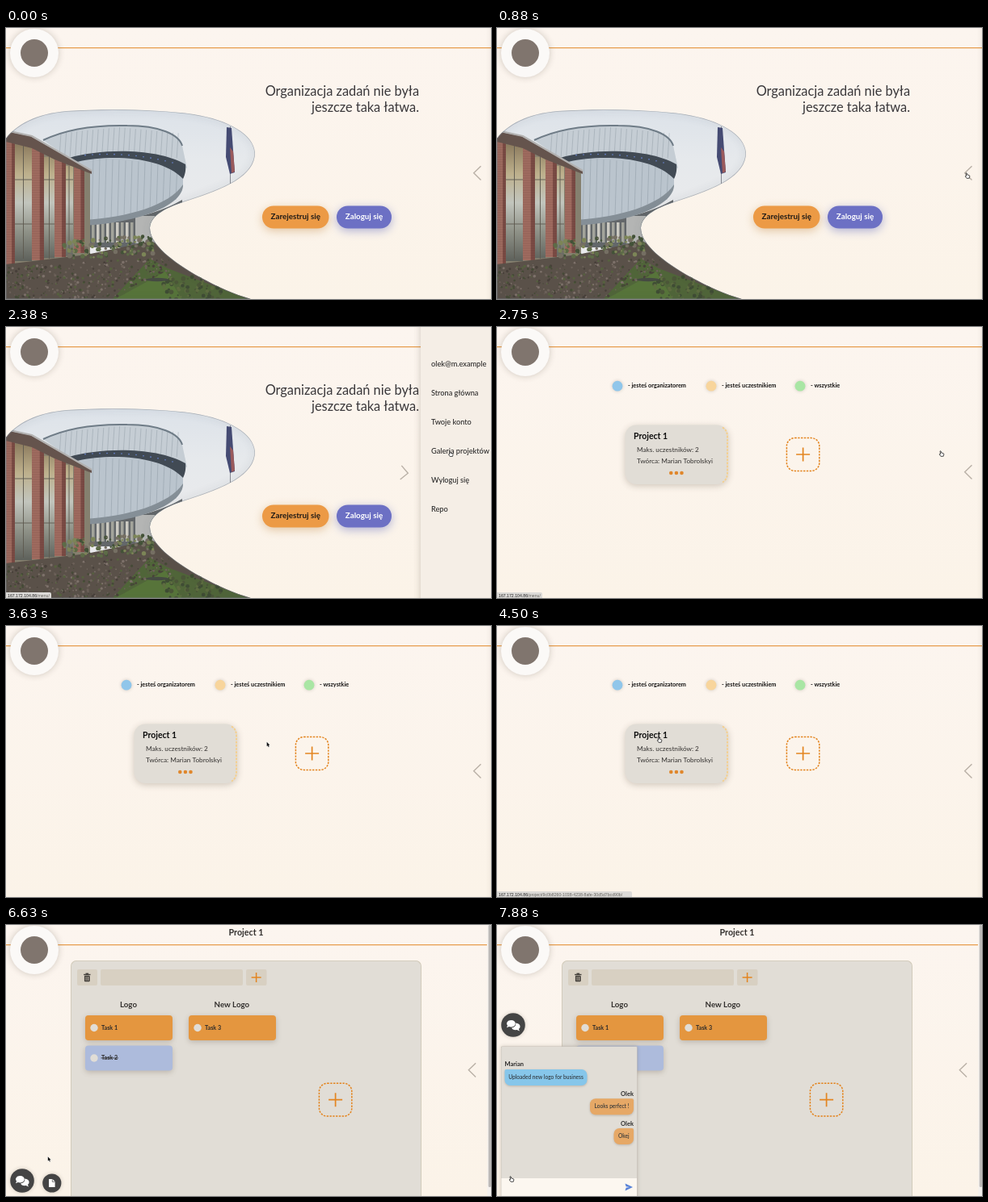
Write an HTML page with a canvas that moves like this. It is 600 px wide and 336 px high and loops after 8 s.

```html
<!DOCTYPE html>
<html lang="pl">
<head>
<meta charset="utf-8">
<title>Organizacja zadań</title>
<style>
html, body { margin: 0; width: 100%; height: 100%; overflow: hidden; background: #fbf4eb; }
canvas { display: block; width: 600px; height: 336px; }
</style>
</head>
<body>
<canvas id="stage"></canvas>
<script>
const W = 600, H = 336, LOOP = 8000, STEP = 125;
const ORANGE = '#e38520', STONE = '#e1ddd6', INK = '#2b2a2a';
const HOST = '167.172.104.86';

const canvas = document.getElementById('stage');
const ctx = canvas.getContext('2d');
const dpr = window.devicePixelRatio || 1;
canvas.width = W * dpr;
canvas.height = H * dpr;
ctx.scale(dpr, dpr);

const clamp = v => Math.max(0, Math.min(1, v));
const ease = v => v * v * (3 - 2 * v);
const ramp = (t, a, b) => ease(clamp((t - a) / (b - a)));

function fill(d, color) {
  ctx.fillStyle = color;
  ctx.fill(new Path2D(d));
}

function line(d, color, width = 1) {
  ctx.strokeStyle = color;
  ctx.lineWidth = width;
  ctx.stroke(new Path2D(d));
}

function gradient(y0, y1, ...colors) {
  const g = ctx.createLinearGradient(0, y0, 0, y1);
  colors.forEach((c, i) => g.addColorStop(i / (colors.length - 1), c));
  return g;
}

function shadow(blur, color = 'rgba(70,55,40,.25)', dy = 0) {
  ctx.shadowBlur = blur * dpr;
  ctx.shadowColor = color;
  ctx.shadowOffsetY = dy * dpr;
}

function noShadow() {
  shadow(0, 'transparent');
}

function box(x, y, w, h, r, color, blur = 0, dy = 0, glow) {
  if (blur) shadow(blur, glow, dy);
  ctx.fillStyle = color;
  ctx.beginPath();
  ctx.roundRect(x, y, w, h, r);
  ctx.fill();
  noShadow();
}

function disc(x, y, r, color, blur = 0) {
  if (blur) shadow(blur);
  ctx.fillStyle = color;
  ctx.beginPath();
  ctx.arc(x, y, r, 0, 7);
  ctx.fill();
  noShadow();
}

// y is the vertical middle of the lowercase letters
function text(s, x, y, size, { weight = 500, align = 'left', color = INK, family = 'Lato, "Noto Sans"' } = {}) {
  ctx.font = `${weight} ${size}px ${family}, sans-serif`;
  ctx.textAlign = align;
  ctx.fillStyle = color;
  ctx.fillText(s, x, y + size * 0.33);
}

function plus(x, y, size, width) {
  const r = size / 2;
  line(`M${x - r},${y}H${x + r}M${x},${y - r}V${y + r}`, ORANGE, width);
}

function addTile(x, y) {
  ctx.setLineDash([2.4, 1.4]);
  ctx.strokeStyle = ORANGE;
  ctx.lineWidth = 1.5;
  ctx.beginPath();
  ctx.roundRect(x - 20.2, y - 20.4, 40.4, 40.8, 10);
  ctx.stroke();
  ctx.setLineDash([]);
  plus(x, y, 17, 1.7);
}

function chevron(x, turn) {
  ctx.save();
  ctx.translate(x, 179.8 + turn);
  ctx.rotate(Math.PI * turn);
  line('M4.5,-8.6L-4.3,0L4.5,8.6', '#b9b0a6', 1.4);
  ctx.restore();
}

function backdrop() {
  ctx.fillStyle = gradient(0, H, '#fcf5ef', '#fbf3e8');
  ctx.fillRect(0, 0, W, H);
}

function header(right) {
  box(0, 23.9, right, 1.4, 0, '#e69c4c');
  disc(35, 31, 30, '#fbf9f7', 9);
  disc(35, 31, 17, '#80756e');
}

const blob = new Path2D('M0,137C12,120 38,106 75,103C125,100 190,101 232,107C276,114 306,132 308,154' +
  'C309,184 268,200 228,213C198,222 179,232 178,248C178,268 206,290 240,309C262,321 282,330 303,336H0Z');

function brick(x, y, w, bottom) {
  box(x, y, w, bottom - y, 0, '#a06c60');
  box(x + w * 0.65, y, w * 0.35, bottom - y, 0, '#7a4c45');
  for (let row = y + 2; row < bottom; row += 3) line(`M${x},${row}h${w}`, 'rgba(80,45,40,.25)', 0.7);
}

function seams(count, x, step, top, bottom) {
  for (let i = 0; i < count; i++) {
    const px = x + i * step;
    line(`M${px},${top(px)}L${px - 2},${bottom(px)}`, 'rgba(105,118,130,.4)', 0.7);
  }
}

function foliage(count, x0, x1, y0, y1, colors, size) {
  let seed = 17;
  const rnd = () => (seed = (seed * 16807) % 2147483647) / 2147483647;
  for (let i = 0; i < count; i++) {
    const x = x0 + rnd() * (x1 - x0);
    const y = y0 + rnd() * (y1 - y0) - x * 0.06;
    disc(x, y, size * (0.5 + rnd()), colors[i % colors.length]);
  }
}

function hall() {
  // entrance
  fill('M97,236C140,243 185,232 218,213V240L180,272H97Z', '#63676a');
  for (let x = 106; x < 160; x += 6) box(x, 241, 3.5, 25, 0, x % 4 ? '#a3a49b' : '#cccac2');
  box(160, 233, 24, 34, 0, '#b4b5b4');

  // lower drum
  fill('M85,163C125,155 190,157 219,178V196C213,216 165,236 97,242Z', '#bac4cd');
  seams(14, 108, 8, x => 161 + (x - 108) * 0.08, x => 239 - (x - 108) ** 2 * 0.0024);
  fill('M97,238C150,235 202,220 219,194C220,220 165,241 97,245Z', '#858f97');

  // upper drum with its window band
  fill('M46,139C75,125 110,120 150,121C190,121 214,132 218,146L224,174C185,152 130,150 82,164Z', '#c5cdd4');
  seams(23, 68, 6.6, x => 123 + Math.abs(x - 140) * 0.1, x => 156 + (x - 140) ** 2 * 0.001);
  line('M46,139C75,125 110,120 150,121C190,121 214,132 218,146', '#6f7c87', 2);
  fill('M78,161C120,149 187,149 222,169C223,177 221,183 219,187C194,160 130,156 88,166Z', '#414a54');
  for (let x = 98; x < 212; x += 9) disc(x, 156.5 + (x - 125) ** 2 * 0.0016, 0.8, '#6a87d8');
}

function wing() {
  fill('M0,136L104,178V284L0,294Z', '#85806f');
  for (const [x, w] of [[11, 21], [47, 13], [73, 10]]) {
    const top = 140 + x * 0.42;
    box(x, top, w, 290 - top - x * 0.1, 0, gradient(145, 288, '#8d7c5f', '#bdb08c', '#c2c5bd', '#8f9288', '#5f625c'));
    line(`M${x + w / 2},${top}V286M${x},188H${x + w}M${x},243H${x + w}`, '#5d594f', 0.9);
  }
  brick(0, 140, 11, 294);
  brick(32, 148, 15, 288);
  brick(60, 160, 14, 284);
  brick(84, 172, 13, 279);
  fill('M0,128L30,134L106,177V181L60,163L32,149L0,141Z', '#65544d');
  line('M0,127L32,134L106,177', '#b2b1b0', 2.2);
}

function garden() {
  fill('M0,293L100,281L180,264L310,340H0Z', '#5a5149');
  fill('M178,286L200,298L310,340H128Z', '#506539');
  foliage(420, 0, 205, 296, 342, ['#454a36', '#7d716a', '#56613f', '#48403a', '#6c6159'], 1.2);
  foliage(120, 72, 182, 268, 291, ['#5d6b47', '#7c8557', '#435238', '#756f63'], 2);
  fill('M128,340L197,302L220,340Z', '#57743a');
  foliage(80, 195, 270, 322, 352, ['#3f4c34', '#4b5638', '#5e6c40'], 2);
  ctx.fillStyle = '#454a42';
  ctx.beginPath();
  ctx.ellipse(187, 312, 14, 2.2, 0, 0, 7);
  ctx.fill();
}

function photo() {
  ctx.save();
  ctx.clip(blob);
  ctx.fillStyle = gradient(100, 225, '#dce2e9', '#e6e9ec', '#e9eaec');
  ctx.fillRect(0, 95, 320, 241);
  hall();
  wing();
  garden();

  // flag
  line('M277.5,122V193', '#8a8d94', 1);
  fill('M273,123L279,124L283,179L277,181L272,160Z', '#454b73');
  fill('M277,148L281,153L283,178L279,180Z', '#9a5a5c');

  // soft inner edge
  shadow(10, 'rgba(60,70,85,.55)');
  ctx.strokeStyle = 'rgba(120,128,138,.5)';
  ctx.lineWidth = 1.5;
  ctx.stroke(blob);
  ctx.restore();
}

function button(label, x, w, color, ink, glow) {
  box(x, 220.5, w, 28, 14, color, 12, 3, glow);
  text(label, x + w / 2, 234.2, 9.8, { weight: 700, align: 'center', color: ink });
}

function sideMenu(open) {
  const x = 603 - 90 * open;
  chevron(x - 20, open * 1.03);
  box(x, -10, 110, H + 20, 0, '#f5eee6', 9);
  const items = ['olek@m.example', 'Strona główna', 'Twoje konto', 'Galeria projektów', 'Wyloguj się', 'Repo'];
  items.forEach((s, i) => text(s, x + 13, 46.3 + 36 * i, 9.2));
}

function statusBar(path, w) {
  box(0, 329, w, 7, [0, 2, 0, 0], '#dcdad7');
  const style = { family: '"Liberation Sans", Arial', weight: 400 };
  text(HOST, 2, 332.9, 5.2, { ...style, color: '#222' });
  const x = 2 + ctx.measureText(HOST).width;
  text(path, x, 332.9, 5.2, { ...style, color: '#66645f' });
}

function home(t) {
  photo();
  const style = { align: 'right', color: '#39373a', weight: 400 };
  text('Organizacja zadań nie była', 511, 78.2, 16.35, style);
  text('jeszcze taka łatwa.', 511, 98.4, 16.35, style);
  button('Zarejestruj się', 317, 82.5, '#ec9a45', '#1f1a16', 'rgba(200,150,90,.5)');
  button('Zaloguj się', 409, 68, '#6c70c4', '#fff', 'rgba(100,110,190,.5)');
  header(W);
  sideMenu(ramp(t, 1050, 1550));
  if (t >= 2250) statusBar('/menu/', 56);
}

function gallery(t) {
  const legend = [
    [149, '#90c6ea', '- jesteś organizatorem'],
    [265, '#f8d59c', '- jesteś uczestnikiem'],
    [375, '#a9e6a4', '- wszystkie']
  ];
  for (const [x, color, label] of legend) {
    disc(x, 73.2, 6.4, color, 4);
    text(label, x + 13, 73, 7.3, { weight: 700, color: '#111' });
  }

  box(158.5, 121.5, 127.5, 73.5, 14, STONE, 8, 2);
  ctx.setLineDash([2.6, 1.5]);
  line('M279,124.5Q285,128 285,136V181Q285,189 279,192.5', '#f5cf8c', 1.8);
  ctx.setLineDash([]);
  text('Project 1', 169, 136, 10.5, { weight: 700, color: '#0d0d0d' });
  text('Maks. uczestników: 2', 173, 152.2, 8.2, { color: '#403e3c' });
  text('Twórca: Marian Tobrolskyi', 173, 166.4, 8.2, { color: '#403e3c' });
  for (let i = 0; i < 3; i++) disc(215.3 + 6.6 * i, 181, 2.3, '#e0872c');

  addTile(378.6, 158);
  header(W);
  sideMenu(0);
  if (t < 3000) statusBar('/menu/', 56);
  if (t >= 3900) statusBar('/project/9c0b8260-1038-4238-8afe-30d5d7bcd90b/', 167);
}

function task(label, x, y, done) {
  box(x, y, 108, 31, 4, done ? '#adbbdc' : '#e4963f', 7, 2);
  disc(x + 11, y + 15.5, 4.7, STONE);
  text(label, x + 20, y + 15.3, 7.2, { weight: 700 });
  if (done) line(`M${x + 19.5},${y + 15.4}H${x + 41}`, INK, 0.8);
}

function trash(x, y) {
  box(x - 4.2, y - 4.2, 8.4, 1.4, 0, '#45413c');
  box(x - 1.8, y - 5.4, 3.6, 1.4, 0, '#45413c');
  box(x - 3.4, y - 2.3, 6.8, 7.6, 1, '#45413c');
  line(`M${x - 1.2},${y - 1}V${y + 4}M${x + 1.2},${y - 1}V${y + 4}`, '#d8d0c1', 0.8);
}

function chatButton(y) {
  disc(20, y, 14.8, '#444', 5);
  ctx.save();
  ctx.translate(20, y);
  fill('M3,-2.4C10,-2 9.4,4 6.8,5L8,7.4L4.6,6C1,6.6 -1.4,5 -1.8,3.4C2,3 4,0.5 3,-2.4Z', '#fff');
  fill('M-2.6,-6C4.4,-6 4.6,2.2 -2.2,2.4C-3.6,2.5 -4.4,2.2 -5,2L-8,3.2L-6.9,0.6C-9.6,-2.4 -6.6,-6 -2.6,-6Z', '#fff');
  ctx.restore();
}

function fileButton() {
  disc(56.8, 320, 11.6, '#444', 5);
  fill('M53,315H57.5L60.6,318V325H53Z', '#fff');
  line('M57.3,315.2V318.4H60.5', '#444', 0.7);
}

function bubble(label, x, y, w, color, corners) {
  box(x, y, w, 20, corners, color, 3, 1);
  text(label, x + w / 2, y + 9.6, 6.6, { align: 'center', color: '#2e3338' });
}

function chat(open) {
  const dy = 193 * (1 - open);
  if (open > 0) {
    ctx.save();
    ctx.translate(0, dy);
    box(5, 150.5, 168.5, 200, 1, '#c9c4bb', 5);
    box(5.5, 151, 167.5, 200, 1, STONE);
    box(5.5, 314, 167.5, 30, 0, '#fcf7f0');
    const right = { weight: 700, align: 'right' };
    text('Marian', 9.5, 172.8, 7.5, { weight: 700 });
    bubble('Uploaded new logo for business', 9.5, 179, 102, '#86c6ea', [2, 7, 7, 7]);
    text('Olek', 169, 209.8, 7.5, right);
    bubble('Looks perfect !', 115, 215.2, 54, '#e6a866', [7, 2, 7, 7]);
    text('Olek', 169, 246.6, 7.5, right);
    bubble('Okej', 144.5, 252, 24.5, '#e6a866', [7, 2, 7, 7]);
    fill('M158.5,320.4L168,325L158.5,329.6L159.6,325.8L164,325L159.6,324.2Z', '#5781d8');
    ctx.restore();
  }
  chatButton(124 + dy);
}

function project(t) {
  box(80, 44, 434, 310, 7, '#cec7b5');
  box(80.8, 44.8, 432.4, 310, 6.5, STONE);
  for (const [x, w] of [[88, 25], [117, 176], [297, 25.5]]) box(x, 55, w, 20, 2, '#d8d0c2');
  trash(100.3, 65);
  plus(309.6, 65, 12, 1.5);
  const title = { weight: 700, align: 'center', color: '#33302e' };
  text('Logo', 151.5, 98.6, 9.7, title);
  text('New Logo', 279.3, 98.6, 9.7, title);
  task('Task 1', 98, 112, false);
  task('Task 2', 98, 149.5, true);
  task('Task 3', 226, 112, false);
  addTile(407.6, 216.7);

  header(595);
  text('Project 1', 297, 9.2, 10.7, title);
  chevron(576.6, 0);
  box(595.5, 0, 4.5, H, 0, '#f4f1ee');
  box(596.8, 0, 3.2, 325, 1.5, '#bdbab8');
  fileButton();
  chat(ramp(t, 7200, 7750));
}

const track = [
  [125, 440, 345], [875, 582, 183], [1875, 582, 183], [2400, 550, 157], [2875, 550, 157],
  [4125, 201, 141], [5500, 201, 141], [6625, 53, 290], [7000, 53, 290], [7200, 18, 315]
];
const clickable = [[875, 2950], [3900, 5700], [7120, LOOP]];

function cursor(t) {
  let [, x, y] = track[0];
  for (let i = 1; i < track.length; i++) {
    const [t0, x0, y0] = track[i - 1];
    const [t1, x1, y1] = track[i];
    if (t < t0) break;
    const k = ramp(t, t0, t1);
    x = x0 + (x1 - x0) * k;
    y = y0 + (y1 - y0) * k;
  }
  const hand = clickable.some(([a, b]) => t >= a && t < b);
  ctx.save();
  ctx.translate(x, y);
  ctx.lineJoin = 'round';
  if (hand) {
    const d = 'M-2,-3Q-1.3,-3.8 -.7,-2.8L-.3,-1L2,-.5Q3,-.2 2.8,1.1L2.2,3.3H-1L-2.8,.9Q-2.6,-.1 -1.3,.6Z';
    fill(d, '#fff');
    line(d, '#222', 0.8);
  } else {
    const d = 'M-1.2,-2.8V2.6L0,1.5L.9,3.6L1.8,3.2L.9,1.2H2.6Z';
    line(d, '#fff', 1);
    fill(d, '#111');
  }
  ctx.restore();
}

function draw(now) {
  const t = Math.floor((now % LOOP) / STEP) * STEP;
  const page = t < 2750 ? home : t < 4750 ? gallery : project;
  backdrop();
  page(t);
  cursor(t);
  requestAnimationFrame(draw);
}

draw(0);
</script>
</body>
</html>
```
